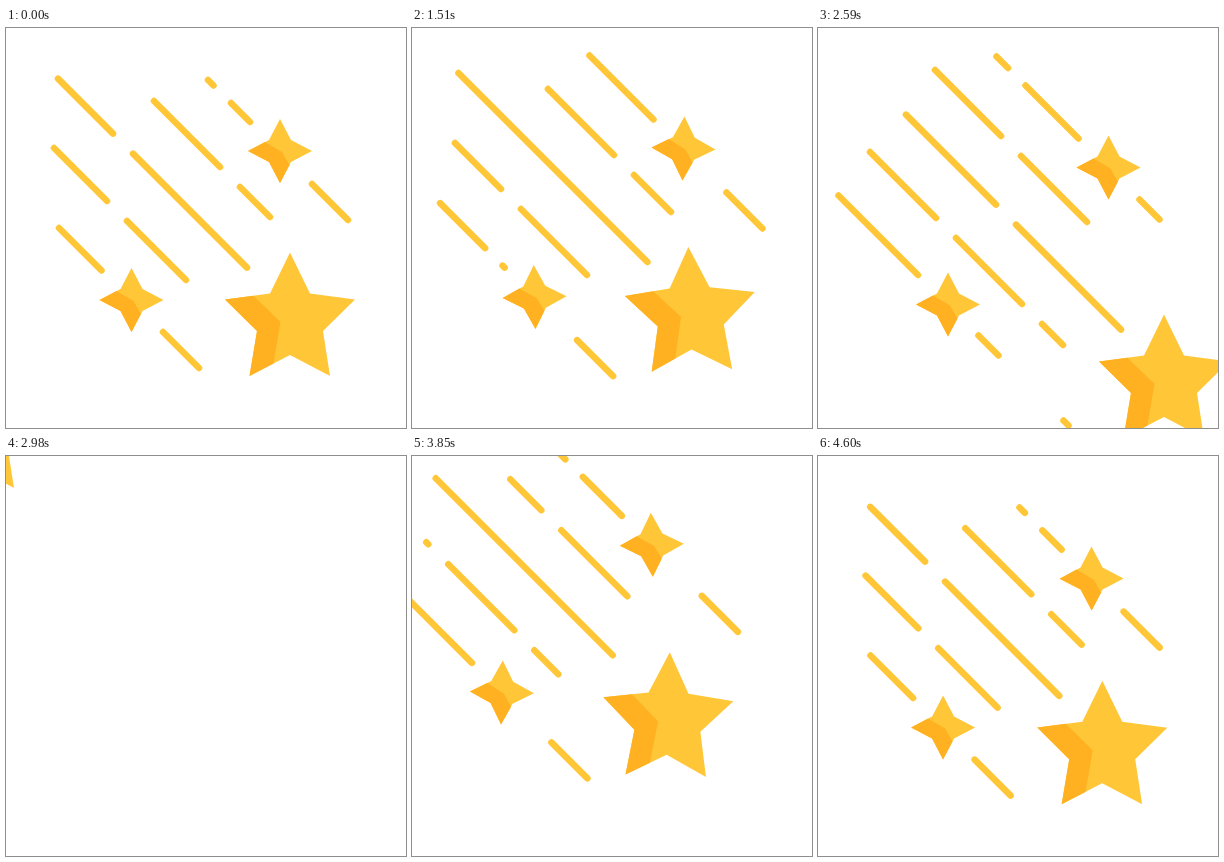
Write an HTML page with a canvas that moves like this. It is 400 by 400 pixels and loops after 4.63 s.

```html
<!DOCTYPE html>
<html lang="en">
<head>
<meta charset="utf-8">
<title>Shooting stars</title>
<style>
  html, body { margin: 0; width: 100%; height: 100%; overflow: hidden; background: #fff; }
  canvas { display: block; width: 400px; height: 400px; }
</style>
</head>
<body>
<canvas id="sky"></canvas>
<script>
const LOOP = 4630, HOLD = 1000, STEP = 30, RUN = 3630;
const LIGHT = '#ffc738', DARK = '#ffb122';

const canvas = document.getElementById('sky');
const ctx = canvas.getContext('2d');
const ratio = window.devicePixelRatio || 1;
canvas.width = canvas.height = 400 * ratio;

// Smooth curve through values at shared key times, at rest on both ends.
const TIMES = [0, 510, 1140, 1590, 2340, 2850, 3130, RUN];
function curve(values) {
  const last = TIMES.length - 1;
  const slope = values.map((_, i) => i === 0 || i === last ? 0
    : (values[i + 1] - values[i - 1]) / (TIMES[i + 1] - TIMES[i - 1]));
  return t => {
    let i = 0;
    while (i < last - 1 && t >= TIMES[i + 1]) i++;
    const h = TIMES[i + 1] - TIMES[i], u = (t - TIMES[i]) / h, v = 1 - u;
    return v * v * ((1 + 2 * u) * values[i] + u * h * slope[i])
         + u * u * ((3 - 2 * u) * values[i + 1] - v * h * slope[i + 1]);
  };
}

const flow = {
  side: curve([0, 112, 257, 387, 587, 725, 795, 808]),
  tail: curve([0, 142, 290, 360, 560, 768, 840, 886.5]),
  mid: curve([0, 79, 289, 382, 570, 723, 800, 860]),
  main: curve([0, 134.5, 345, 429, 623, 752, 805, 840])
};
const tailGrowth = curve([0, 22, 34, 40, 36, 25, 14, 0]);

// Diagonal travel: pull back, rush out, then glide in from the upper left.
const BACK = 1200, RUSH = 390, GONE = 1920, ENTER = 1980;
const decay = t => Math.exp(-(t - 2340) / 380);
const rest = decay(RUN);

function mover(pull, reach, power, far, bounce = 0) {
  return t => {
    if (t < BACK) {
      const u = t / BACK;
      return pull * u * u * (3 - 2 * u);
    }
    if (t < ENTER) return pull + (reach - pull) * ((t - BACK) / RUSH) ** power;
    const over = t > 3150 ? bounce * Math.sin(Math.PI * (t - 3150) / 480) ** 2 : 0;
    return over - far * (decay(t) - rest) / (1 - rest);
  };
}

const move = {
  big: mover(-14.3, 62, 2.5, 120, 15),
  right: mover(-6.5, 16.5, 3.6, 145),
  left: mover(-7.5, 4.5, 4.7, 151),
  upper: mover(-13, 17, 3.6, 143),
  lower: mover(-13, 65, 2.5, 143)
};

const rushGrowth = size => t =>
  t > BACK && t < ENTER ? size * Math.min(1, (t - BACK) / RUSH) : 0;
const none = () => 0;

// Dashes run along y = x - c and show only between x = from and x = to.
const tracks = [
  { c: 150, from: 202, to: 244, at: 225, dash: 81, period: 98.5, flow: flow.tail, move: move.right, grow: tailGrowth },
  { c: -147, from: 53, to: 95.5, at: 50, dash: 81, period: 98.5, flow: flow.tail, move: move.left, grow: tailGrowth },
  { c: 150, from: 305, to: 394, at: 306, dash: 36, period: 101, flow: flow.side, move: move.right, grow: none },
  { c: -147, from: 156, to: 246, at: 157, dash: 36, period: 101, flow: flow.side, move: move.left, grow: none },
  { c: 75, from: 132, to: 264, at: 234, dash: 66, period: 86, flow: flow.mid, move: move.upper, grow: rushGrowth(36) },
  { c: -72, from: 48, to: 180, at: 121, dash: 66, period: 86, flow: flow.mid, move: move.lower, grow: rushGrowth(70) },
  { c: 1.4, from: 52, to: 241, at: 127, dash: 190, period: 210, flow: flow.main, move: move.big, grow: rushGrowth(26) }
];

const bigStar = {
  body: [[0, -67.5], [20, -26.5], [65, -20.5], [33, 11], [40, 56], [0, 35], [-40.5, 56], [-33, 11], [-65, -20.5], [-20, -26.5]],
  shade: [[-65, -20.5], [-36.5, -24.3], [-9.5, 2], [-16.5, 43.5], [-40.5, 56], [-33, 11]]
};
const smallStar = {
  body: [[0, -32], [11, -11], [32, 0], [11, 11], [0, 32], [-11, 11], [-32, 0], [-11, -11]],
  shade: [[-32, 0], [-15, -9], [2, 1], [9.5, 14], [0, 32], [-11, 11]]
};
const stars = [
  { shape: bigStar, x: 284, y: 292, move: move.big, tilt: 1.8 },
  { shape: smallStar, x: 274, y: 123, move: move.right, tilt: -1.8 },
  { shape: smallStar, x: 125.5, y: 272, move: move.left, tilt: 1.6 }
];

function sway(t) {
  if (t < 1140) return -Math.sin(Math.PI * t / 1140);
  return t > ENTER ? Math.sin(Math.PI * (t - 1950) / (RUN - 1950)) : 0;
}

function fill(points, color) {
  ctx.beginPath();
  for (const [x, y] of points) ctx.lineTo(x, y);
  ctx.closePath();
  ctx.fillStyle = color;
  ctx.fill();
}

function drawTrack(k, t) {
  const shift = k.move(t), from = k.from - k.grow(t);
  const first = k.at + k.flow(t);
  let x = first - Math.ceil((first - from) / k.period) * k.period;
  ctx.beginPath();
  for (; x < k.to; x += k.period) {
    const a = Math.max(x, from), b = Math.min(x + k.dash, k.to);
    if (b <= a) continue;
    ctx.moveTo(a + shift, a + shift - k.c);
    ctx.lineTo(b + shift, b + shift - k.c);
  }
  ctx.stroke();
}

function drawStar(s, t) {
  const d = s.move(t);
  ctx.save();
  ctx.translate(s.x + d, s.y + d);
  ctx.rotate(s.tilt * sway(t) * Math.PI / 180);
  fill(s.shape.body, LIGHT);
  fill(s.shape.shade, DARK);
  ctx.restore();
}

function draw(t) {
  ctx.setTransform(ratio, 0, 0, ratio, 0, 0);
  ctx.fillStyle = '#fff';
  ctx.fillRect(0, 0, 400, 400);
  if (t > GONE && t < ENTER) return;
  ctx.strokeStyle = LIGHT;
  ctx.lineWidth = 6.5;
  ctx.lineCap = 'round';
  tracks.forEach(k => drawTrack(k, t));
  stars.forEach(s => drawStar(s, t));
}

const start = performance.now();
function tick() {
  const t = (performance.now() - start) % LOOP;
  draw(Math.max(0, Math.floor((t - HOLD) / STEP) * STEP));
  requestAnimationFrame(tick);
}
tick();
</script>
</body>
</html>
```
